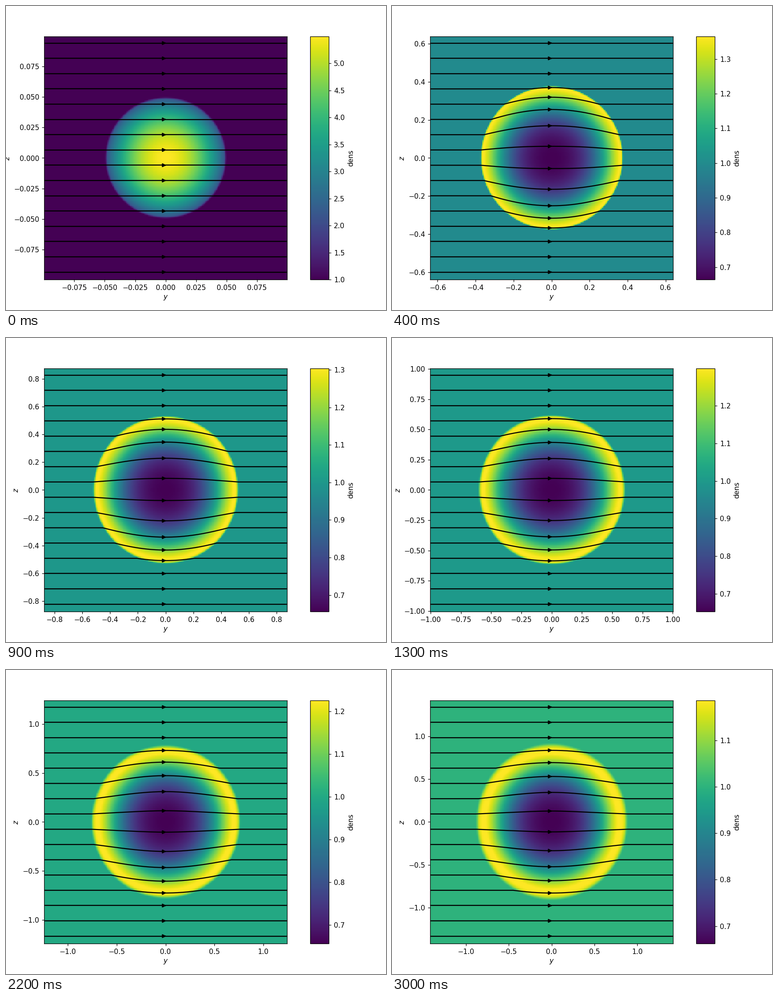
A matplotlib script that plays this animation: 837x669 px, repeating every 3200 ms.

```python
import numpy as np
import matplotlib.pyplot as plt
from matplotlib.animation import FuncAnimation
from matplotlib.patches import FancyArrowPatch

W, H, DPI = 837, 669, 110
FRAMES, LAST, INTERVAL = 32, 30, 100

# Blast state at a few steps. Lengths are in half widths of the view, except "half".
STEPS = [1, 4, 9, 13, 18, 22, 30]
KEYS = {
    "half": [0.372, 0.6395, 0.8745, 1.0037, 1.145, 1.243, 1.417],
    "rad_y": [0.570, 0.588, 0.601, 0.607, 0.615, 0.619, 0.630],
    "rad_z": [0.572, 0.592, 0.610, 0.619, 0.625, 0.635, 0.648],
    "peak": [0.970, 0.955, 0.930, 0.915, 0.900, 0.885, 0.860],
    "vmax": [1.450, 1.3656, 1.3042, 1.2999, 1.2594, 1.2261, 1.1862],
    "vmin": [0.690, 0.6639, 0.6557, 0.6522, 0.6542, 0.6563, 0.6623],
    "core": [0.700, 0.685, 0.685, 0.685, 0.690, 0.700, 0.715],
    "power": [3.0, 2.65, 2.20, 2.0, 1.78, 1.60, 1.40],
}
START = dict(half=0.0998, rad_y=0.5, rad_z=0.5, vmax=5.497, vmin=1.0)

CELLS = 200
axis = (np.arange(CELLS) + 0.5) * 2 / CELLS - 1
YY, ZZ = np.meshgrid(axis, axis)
LINE_Y = np.linspace(-1, 1, 241)
LINE_Z = 0.945 - 0.12556 * np.arange(16)


def state(step):
    if step == 0:
        return START
    x = np.log(step)
    s = {k: np.interp(x, np.log(STEPS), v) for k, v in KEYS.items()}
    s["half"] = np.exp(np.interp(x, np.log(STEPS), np.log(KEYS["half"])))
    return s


def ease(t):
    return np.sin(np.pi / 2 * t) ** 2


def start_density(u):
    inside = START["vmax"] - 3.5 * u**2
    edge = ease(np.clip((1.005 - u) / 0.05, 0, 1))
    return 1 + (inside - 1) * edge


def blast_density(u, s):
    """Thin core rising to a dense shell, then a steep drop to the medium."""
    x = np.clip(u / s["peak"], 0, 1)
    rise = 0.5 * x**2 + 0.5 * ease(x**2.1)
    inner = s["vmin"] + (s["vmax"] - s["vmin"]) * rise
    t = np.clip((u - s["peak"]) / (1 - s["peak"]), 0, 1)
    outer = s["vmax"] + (1 - s["vmax"]) * ease(t**2.7)
    return np.where(u < s["peak"], inner, outer)


def field_line(z0, s):
    """Height of a field line pushed outwards by the bubble."""
    z = np.full_like(LINE_Y, z0)
    if "core" not in s:
        return z
    for _ in range(30):
        q = np.minimum(np.hypot(LINE_Y / s["rad_y"], z / s["rad_z"]), 1)
        pull = s["core"] + (1 - s["core"]) * q ** s["power"]
        z = 0.5 * (z + z0 / pull)
    return z


fig = plt.figure(figsize=((W + 1e-6) / DPI, (H + 1e-6) / DPI), dpi=DPI,
                 facecolor="white")
ax = fig.add_axes([0.1, 0.1, 0.64, 0.8])
cax = fig.add_axes([0.8, 0.1, 0.05, 0.8])
image = ax.imshow(np.ones((CELLS, CELLS)), origin="lower", cmap="viridis",
                  interpolation="nearest", extent=(-1, 1, -1, 1))
bar = fig.colorbar(image, cax=cax)
bar.set_label("dens")
ax.set_xlabel("$y$")
ax.set_ylabel("$z$")

lines = [ax.plot([], [], color="black", lw=1.5)[0] for _ in LINE_Z]
arrows = []
for _ in LINE_Z:
    arrow = FancyArrowPatch((0, 0), (1, 0), arrowstyle="-|>", mutation_scale=10,
                            shrinkA=0, shrinkB=0, color="black", lw=1.5, zorder=3)
    arrows.append(ax.add_patch(arrow))


def update(i):
    step = min(i, LAST)
    s = state(step)
    half = s["half"]
    u = np.hypot(YY / s["rad_y"], ZZ / s["rad_z"])
    image.set_data(start_density(u) if step == 0 else blast_density(u, s))
    image.set_extent((-half, half, -half, half))
    image.set_clim(s["vmin"], s["vmax"])
    ax.set_xlim(-half, half)
    ax.set_ylim(-half, half)
    for z0, line, arrow in zip(LINE_Z, lines, arrows):
        z = field_line(z0, s)
        line.set_data(LINE_Y * half, z * half)
        mid = z[len(z) // 2] * half
        arrow.set_positions((-0.008 * half, mid), (0.006 * half, mid))
    return [image, *lines, *arrows]


anim = FuncAnimation(fig, update, frames=FRAMES, interval=INTERVAL,
                     init_func=lambda: update(0), repeat=True, repeat_delay=0,
                     blit=False)
plt.show()
```
